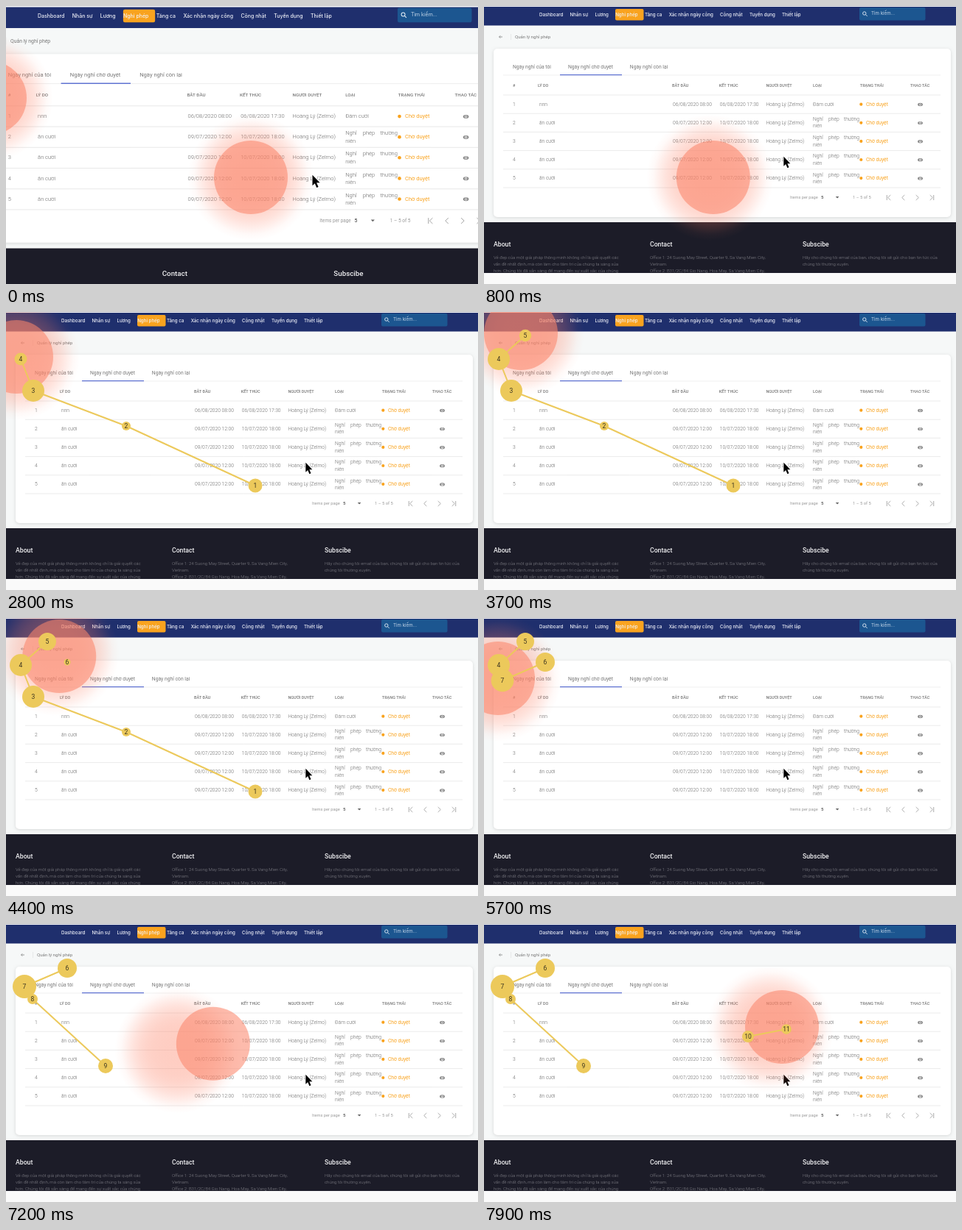
Recreate the animation shown at these times as an HTML page with a canvas. Size 640 px wide and 378 px high, loop 8 s.

```html
<!DOCTYPE html>
<html lang="vi">
<head>
<meta charset="utf-8">
<style>
html, body { margin: 0; width: 100%; height: 100%; overflow: hidden; background: #fafafa; }
canvas { display: block; }
</style>
</head>
<body>
<canvas id="stage" width="640" height="378"></canvas>
<script>
const c = document.getElementById('stage').getContext('2d');
const LOOP = 8000, STEP = 100;
const LIFE = 3000;      // how long a finished fixation stays
const GROWTH = 40;      // dwell time per pixel of radius
const MAX_GAP = 320;    // longer pauses break the line
const ORANGE = '#f9a31f', YELLOW = '#ecc95b';

// Each fixation: x, y, radius, start
const fixations = [
  [338, 236, 9.5, 1100], [163, 155, 6, 1700], [37, 107, 15, 1980], [20, 64, 15, 2600],
  [56, 32, 12, 3450], [83, 60, 13, 4400], [25, 85, 16, 5100], [36, 102, 7, 5900],
  [135, 193, 10, 6480], [358, 153, 8, 7250], [410, 143, 15, 7800]
].map(([x, y, r, start]) => ({ x, y, r, start, end: start + r * GROWTH }));

const clamp = v => Math.max(0, Math.min(1, v));
const column = k => 255 + 63.7 * k;

// Draws a line of text and returns its width
function text(s, x, y, size, color, weight = 400, font = 'Roboto') {
  c.font = `${weight} ${size}px ${font}, sans-serif`;
  c.fillStyle = color;
  c.fillText(s, x, y);
  return c.measureText(s).width;
}

function rect(x, y, w, h, color, r = 0) {
  c.fillStyle = color;
  c.beginPath();
  c.roundRect(x, y, w, h, r);
  c.fill();
}

function disc(x, y, r, color) {
  c.fillStyle = color;
  c.beginPath();
  c.arc(x, y, r, 0, 7);
  c.fill();
}

function stroke(path, color, width) {
  c.strokeStyle = color;
  c.lineWidth = width;
  c.stroke(new Path2D(path));
}

function header() {
  rect(0, 1, 640, 25.6, '#1f2f6d');
  rect(178, 4, 38.5, 15.5, ORANGE, 2);
  let x = 75;
  for (const s of ['Dashboard', 'Nhân sự', 'Lương', 'Nghỉ phép', 'Tăng ca',
    'Xác nhận ngày công', 'Công nhật', 'Tuyển dụng', 'Thiết lập'])
    x += text(s, x, 11.8, 6.2, '#f1f3fa', 500, 'Inter') + 9.3;
  rect(509, 2, 89.5, 17.5, '#1c5690', 2);
  stroke('M518 10a2.2 2.2 0 1 0-4.4 0a2.2 2.2 0 1 0 4.4 0M517.5 11.7l2.2 2.2', '#e4edf6', 0.9);
  text('Tìm kiếm...', 525, 10.5, 6.2, '#c4d6e8', 400, 'Inter');
  stroke('M25 42h-4.5m1.8-1.8l-1.8 1.8l1.8 1.8', '#777', 0.7);
  stroke('M36.5 38v8', '#ddd', 0.6);
  text('Quản lý nghỉ phép', 42, 42.3, 6.1, '#777');
}

function tabs() {
  stroke('M26 94h593', '#e6e6e6', 0.6);
  stroke('M103 93.7h84', '#5f72d2', 1.3);
  let x = 39;
  for (const s of ['Ngày nghỉ của tôi', 'Ngày nghỉ chờ duyệt', 'Ngày nghỉ còn lại'])
    x += text(s, x, 83.3, 6.75, '#777') + 23;
}

function row(i) {
  const y = 133.7 + i * 25.1;
  const cell = (s, x, dy = 0) => text(s, x, y + dy, 6.7, '#666', 300);
  cell(i + 1, 39);
  cell(i ? 'ăn cưới' : 'nnn', 75);
  cell(i ? '09/07/2020 12:00' : '06/08/2020 08:00', column(0) + 1);
  cell(i ? '10/07/2020 18:00' : '06/08/2020 17:30', column(1) + 1);
  cell('Hoàng Lý (Zelmo)', column(2));
  if (i) {
    ['Nghỉ', 'phép', 'thường'].forEach((s, k) => cell(s, column(3) + 21 * k, -4.5));
    cell('niên', column(3), 4.7);
  } else cell('Đám cưới', column(3));
  disc(column(4) + 1.5, y, 2.1, ORANGE);
  text('Chờ duyệt', 518, y, 6.7, ORANGE);
  c.fillStyle = '#888';
  c.beginPath();
  c.ellipse(591.5, y + 0.3, 3.4, 2.2, 0, 0, 7);
  c.fill();
  disc(591.5, y + 0.3, 1.5, '#fff');
  disc(591.5, y + 0.3, 0.9, '#888');
}

function paginator() {
  text('Items per page', 415, 260.3, 5.7, '#999');
  text('5', 457, 260.3, 6, '#555', 500);
  c.fillStyle = '#666';
  c.fill(new Path2D('M476.8 259h4.6l-2.3 2.5z'));
  text('1 – 5 of 5', 500, 260.3, 5.8, '#999');
  for (let k = 0; k < 4; k++) {
    const x = 549.5 + 19 * k, d = k < 2 ? 1.8 : -1.8;
    stroke(`M${x + d} 257l${-2 * d} 3.5l${2 * d} 3.5`, '#999', 0.8);
    if (k % 3 == 0) stroke(`M${x - 1.8 * d} 257v7`, '#999', 0.8);
  }
}

function card() {
  c.shadowColor = 'rgba(0,0,0,.13)';
  c.shadowBlur = 4;
  c.shadowOffsetY = 1;
  rect(13, 58, 620, 229, '#fff', 5);
  c.shadowColor = 'transparent';
  tabs();
  const head = (s, x) => text(s, x, 108.3, 5.5, '#777', 500);
  head('#', 39);
  head('LÝ DO', 73);
  ['BẮT ĐẦU', 'KẾT THÚC', 'NGƯỜI DUYỆT', 'LOẠI', 'TRẠNG THÁI'].forEach((s, k) => head(s, column(k)));
  head('THAO TÁC', 578);
  for (let i = 0; i < 6; i++) stroke(`M26 ${121 + i * 25.2}h593`, '#e2e2e2', 0.7);
  for (let i = 0; i < 5; i++) row(i);
  paginator();
}

function footer() {
  rect(0, 294, 640, 69, '#1c1c28');
  c.save();
  c.beginPath();
  c.rect(0, 294, 640, 69);
  c.clip();
  const block = (x, title, ...lines) => {
    text(title, x, 324.5, 8.7, '#f0f0f2', 500);
    lines.forEach((s, i) => text(s, x, 342.5 + i * 8.9, 6.05, '#85858c', 300));
  };
  block(13, 'About', 'Vẻ đẹp của một giải pháp thông minh không chỉ là giải quyết các',
    'vấn đề nhất định, mà còn làm cho tâm trí của chúng ta sáng sủa',
    'hơn. Chúng tôi đã sẵn sàng để mang đến sự xuất sắc của chúng');
  block(225, 'Contact', 'Office 1: 24 Suong May Street, Quarter 9, Sa Vang Mien City,',
    'Vietnam.', 'Office 2: B31/2C/84 Gio Nang, Hoa May, Sa Vang Mien City,');
  block(432, 'Subscibe', 'Hãy cho chúng tôi email của bạn, chúng tôi sẽ gửi cho bạn tin tức của',
    'chúng tôi thường xuyên.');
  c.restore();
}

function cursor() {
  const arrow = new Path2D('M406.3 204.8v13l2.9-2.7l2.2 5.1l2.1-.9l-2.2-5h4z');
  c.strokeStyle = '#fff';
  c.lineWidth = 1.2;
  c.stroke(arrow);
  c.fillStyle = '#000';
  c.fill(arrow);
}

// The gaze rests on each fixation and glides on to the next
function gazeAt(t) {
  let { x, y } = fixations[0];
  x -= 28 * Math.sin(Math.PI * clamp(t / 1100));
  fixations.slice(1).forEach((f, i) => {
    const left = fixations[i].end, p = clamp((t - left) / (f.start + 100 - left));
    x += (f.x - x) * p;
    y += (f.y - y) * p;
  });
  return [x - 6, y - 3];
}

function heat([x, y], [gx, gy]) {
  const R = 86, glow = c.createRadialGradient(gx, gy, 0, gx, gy, R);
  for (let p = 0; p <= 10; p++)
    glow.addColorStop(p / 10, `rgba(253,125,96,${0.38 * (1 - (p / 10) ** 4) ** 2})`);
  disc(gx, gy, R, glow);
  disc(x, y, 50, 'rgba(251,135,107,.56)');
}

function scanPath(t) {
  const alive = f => t >= f.start && t < f.end + LIFE;
  fixations.forEach((f, i) => {
    const prev = fixations[i - 1];
    if (prev && alive(f) && alive(prev) && f.start - prev.end < MAX_GAP)
      stroke(`M${prev.x} ${prev.y}L${f.x} ${f.y}`, YELLOW, 2);
  });
  c.textAlign = 'center';
  fixations.forEach((f, i) => {
    if (!alive(f)) return;
    const grown = clamp((t - f.start) / (f.end - f.start));
    disc(f.x, f.y, f.r * (0.35 + 0.65 * grown), YELLOW);
    text(i + 1, f.x, f.y + 0.5, 8.5, '#3c3521');
  });
  c.textAlign = 'left';
}

function draw(t) {
  const p = clamp((t - 100) / 600), zoom = 1 - p * p * (3 - 2 * p);
  c.textBaseline = 'middle';
  rect(0, 0, 640, 378, '#fafafa');
  c.save();
  c.translate(-41.2 * zoom, 0.3 * zoom);
  c.scale(1 + 0.124 * zoom, 1 + 0.12 * zoom);
  rect(0, 26.6, 640, 267.4, '#f6f8f8');
  header();
  card();
  footer();
  cursor();
  c.restore();
  if (t < 200) heat([-22, 125], [-22, 125]);
  heat(gazeAt(t), gazeAt(t - STEP));
  scanPath(t);
}

function frame() {
  draw(Math.floor(performance.now() % LOOP / STEP) * STEP);
  requestAnimationFrame(frame);
}
frame();
</script>
</body>
</html>
```
